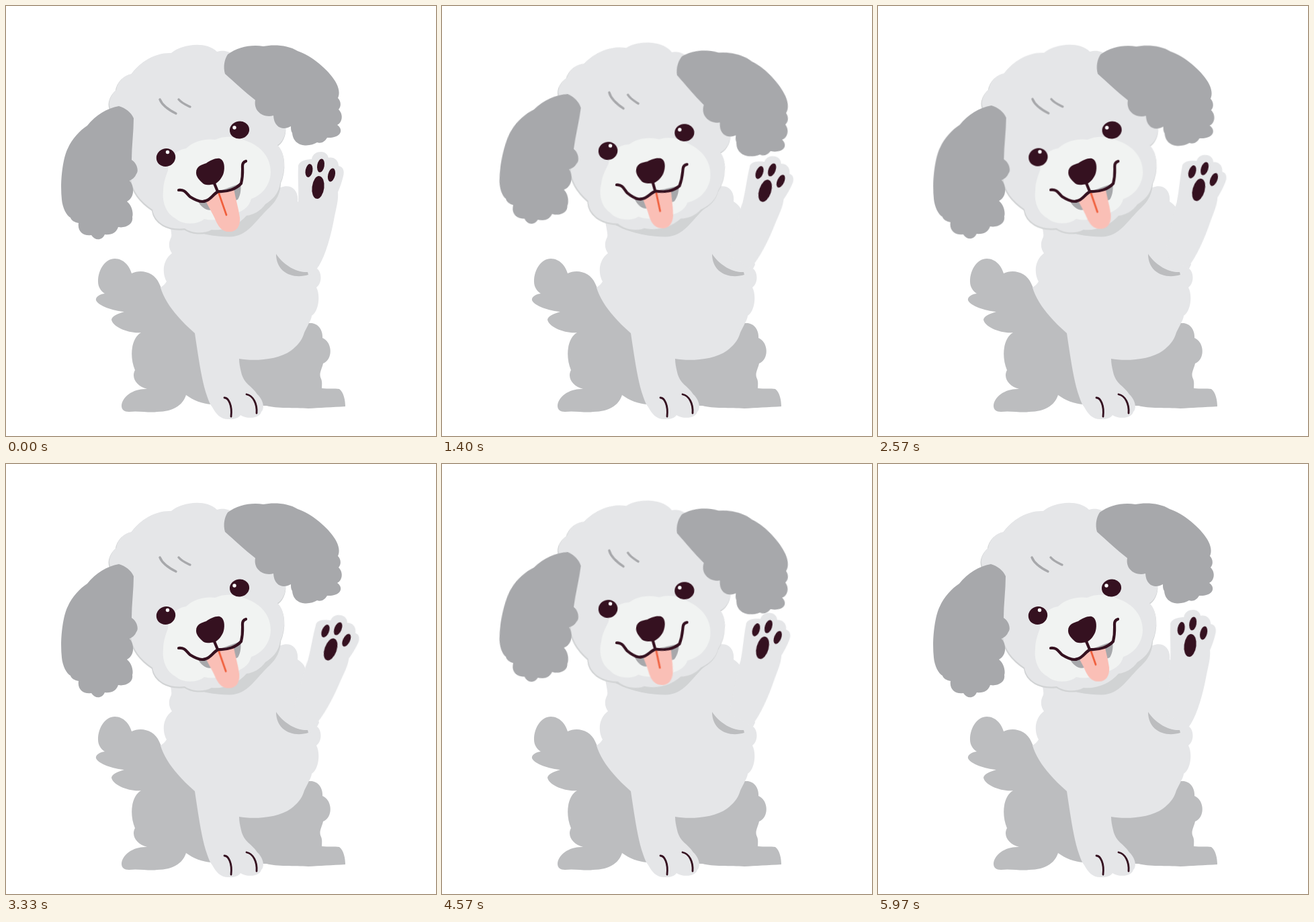
Write an HTML page that moves like this. It is 640 by 640 pixels and loops after 6.01 s.

```html
<!DOCTYPE html>
<html lang="en">
<head>
<meta charset="utf-8">
<title>Waving puppy</title>
<style>
  html, body { margin: 0; width: 100%; height: 100%; overflow: hidden; background: #fff; }
  svg { display: block; width: 100%; height: 100%; }

  .fur { fill: #e5e6e8; }
  .back { fill: #bcbdbf; }
  .ear { fill: #a7a8ab; }
  .shade { fill: #d1d3d4; }
  .ink { fill: #351120; }
  .line { fill: none; stroke: #351120; stroke-linecap: round; stroke-linejoin: round; }
  .brow { fill: none; stroke: #a7a8ab; stroke-width: 3.4; stroke-linecap: round; }

  .head, .arm, .tongue { animation: 6010ms cubic-bezier(.5, 0, .5, 1) infinite; }
  .head { transform-origin: 322px 294px; animation-name: tilt; }
  .arm {
    transform-origin: 447px 357px;
    animation-name: wave;
    animation-duration: calc(6010ms / 3);
    animation-delay: 30ms;
  }
  .tongue { animation-name: pant; }

  @keyframes tilt {
    0%, 10.65%, 43.93%, 63.89%, 96.01%, 100% { transform: rotate(0deg); }
    17.3%, 37.27%, 70.55%, 89.35% { transform: rotate(7.1deg); }
  }
  @keyframes wave {
    0%, 100% { transform: rotate(0deg); }
    50% { transform: rotate(15deg); }
  }
  /* ends retracted, so the tongue snaps out when the loop restarts */
  @keyframes pant {
    0%, 13.311%, 26.622%, 39.933%, 53.245%, 66.556%, 79.867%, 93.178% { transform: translate(0, 0); }
    6.656%, 19.967%, 33.278%, 46.589%, 59.9%, 73.211%, 86.522%, 99.834%, 100% { transform: translate(-4px, -12.5px); }
  }
</style>
</head>
<body>
<svg viewBox="0 0 640 640">
  <defs>
    <path id="skull" d="M155 152C151 141 158 130 164 125C166 112 176 103 187 101C200 83 222 69 246 70
      C260 58 296 51 314 68C325 65 332 68 338 72L416 180C417 192 411 203 404 207
      C415 217 418 242 408 264C406 279 397 288 386 295C379 305 368 311 358 312
      C345 327 325 335 306 333C294 340 276 338 266 331C242 334 221 323 218 303
      C200 291 188 275 186 258Z"/>
    <clipPath id="mouth">
      <path d="M270 283C282 289 291 293 297 290C305 288 308 280 316 276C330 277 343 272 350 264V350H270Z"/>
    </clipPath>
  </defs>

  <!-- tail, haunches and hind feet -->
  <path class="back" d="M137 410C137 392 148 376 162 376C175 376 184 387 187 398C201 391 221 396 228 413
    C231 419 232 423 234 428L300 470L452 472C464 471 472 482 471 494C486 500 487 526 472 532
    C470 541 465 547 469 555C471 560 470 565 470 569C480 570 489 569 496 570C503 575 505 588 505 596
    C486 597 466 598 450 599C430 598 402 599 388 595L306 593C292 592 279 587 268 579
    C262 597 245 604 225 604C213 606 198 602 183 604C176 604 172 601 172 595C173 581 190 569 210 570
    C194 566 186 553 192 542C183 520 187 494 201 486C184 488 159 478 157 467C157 462 166 458 176 455
    C160 454 137 446 134 438C133 434 138 429 147 428C141 424 137 418 137 410Z"/>

  <!-- chest and front leg -->
  <path class="fur" d="M243 320C245 334 248 341 245 346C241 354 243 363 247 368C233 378 232 398 239 410
    C237 414 233 417 230 419C237 443 258 467 281 487C286 520 290 550 297 574C301 586 303 592 307 597
    C313 608 320 616 333 615C341 615 346 613 349 609C361 616 378 613 380 604C386 598 382 585 374 578
    C366 565 354 563 350 545C348 537 347 531 347 525C368 529 405 527 424 513C436 504 441 496 444 486
    C447 480 449 476 453 468C454 465 455 463 455 461C466 454 468 430 462 419C471 412 470 396 463 391
    L466 385L446 313C447 302 442 296 434 291C436 274 424 264 409 270L300 250Z"/>
  <path class="back" d="M402 369C411 383 430 397 449 396L450 400C427 407 402 397 402 369Z"/>
  <g class="line" stroke-width="2.8">
    <path d="M325 583C331 583 337 594 335 611M358 578C368 580 374 592 373 606"/>
  </g>
  <path class="shade" d="M258 326C285 340 310 343 332 343.500C360 344 372 318 392 300C403 290 409 277 409 262L330 260Z"/>

  <g class="head">
    <use href="#skull" class="shade" stroke="#d1d3d4" stroke-width="1.500" transform="translate(-.5 1.5)"/>
    <use href="#skull" class="fur"/>

    <path class="ear" d="M168 149C178 152 186 158 190 167C190 188 187 208 187 229C195 234 198 245 194 250
      C192 255 188 258 184 260C191 268 192 285 180 291C187 296 190 308 188 314
      C190 325 178 331 167 329C164 338 157 341 147 340C143 349 133 350 127 341C115 343 106 335 108 323
      C102 322 97 319 96 315C90 312 84 300 83 288C80 260 85 225 92 212C98 198 110 185 121 178
      C133 163 150 152 168 149Z"/>
    <path class="ear" d="M330 72C345 61 365 57 383 60C398 57 420 58 434 67C455 74 480 95 490 112
      C496 122 497 131 494 137C499 142 499 150 495 154C503 162 500 174 493 177C503 184 499 197 478 196
      C474 203 468 205 463 203C452 210 428 211 426 189C424 186 424 183 424 179C412 186 399 181 398 163
      C383 167 368 157 371 140C355 128 340 113 326 101C323 90 325 80 330 72Z"/>
    <path class="brow" d="M229 139C233 149 243 155 253 160M257 139C262 145 268 147 274 150"/>

    <path fill="#f1f3f2" d="M241 245C242 228 250 215 268 212C280 200 300 197 311 199C325 192 345 194 358 201
      C380 209 394 225 394 248C393 268 380 282 365 287C362 300 350 307 338 310C325 318 305 320 295 317
      C285 326 262 326 252 316C240 310 232 294 234 276C234 263 238 253 241 245Z"/>

    <ellipse class="ink" cx="238" cy="225.500" rx="14.300" ry="13.300" transform="rotate(-20 238 225.500)"/>
    <ellipse class="ink" cx="347.500" cy="184.500" rx="14.600" ry="13" transform="rotate(-10 347.500 184.500)"/>
    <circle cx="240.500" cy="217.500" r="2.700" fill="#fff"/>
    <circle cx="340" cy="181" r="2.700" fill="#fff"/>

    <path class="ear" d="M285 289C290 300 300 306 307 303L345 288C350 280 350 270 349 264L316 276L297 290Z"/>
    <g clip-path="url(#mouth)">
      <g class="tongue">
        <path fill="#fabfb6" d="M296 287L310 272L339 271C341 285 346 300 348 315C349 328 343 336 333 336
          C322 337 316 328 312 319C308 309 301 299 296 287Z"/>
        <path d="M316.500 278L328 311" fill="none" stroke="#f05f3c" stroke-width="2.700" stroke-linecap="round"/>
      </g>
    </g>
    <path class="line" stroke-width="4.200" d="M257 274C267 273 268 279 274 284C282 289 291 293 297 290
      C305 288 308 280 316 276C330 277 343 272 350 264C353 252 352 246 352 238C352 234 354 232 357 231
      M310 264L315 276"/>
    <path class="ink" d="M283 248C283 238 292 236 298 234C304 230 312 226 318 227C325 229 326 240 324 248
      C322 256 316 262 311 265C304 266 296 268 292 263C287 258 283 254 283 248Z"/>
  </g>

  <g class="arm">
    <path class="fur" d="M433 314C433 307 434 300 435 293C436 275 434 255 435 240C434 232 445 228 455 228
      C456 220 463 217 469 217C475 217 479 221 480 226C487 224 495 229 495 238C502 239 504 246 502 253
      C500 262 497 270 494 277C495 288 492 299 489 313C484 341 476 370 465 388L430 375Z"/>
    <g class="ink">
      <ellipse cx="451" cy="245" rx="5.300" ry="10" transform="rotate(10 451 245)"/>
      <ellipse cx="468.500" cy="237.500" rx="5.300" ry="10.200" transform="rotate(10 468.500 237.500)"/>
      <ellipse cx="484.500" cy="251.500" rx="5.200" ry="10.200" transform="rotate(14 484.500 251.500)"/>
      <ellipse cx="464.500" cy="270" rx="9" ry="17" transform="rotate(7 464.500 270)"/>
    </g>
  </g>
</svg>
</body>
</html>
```
